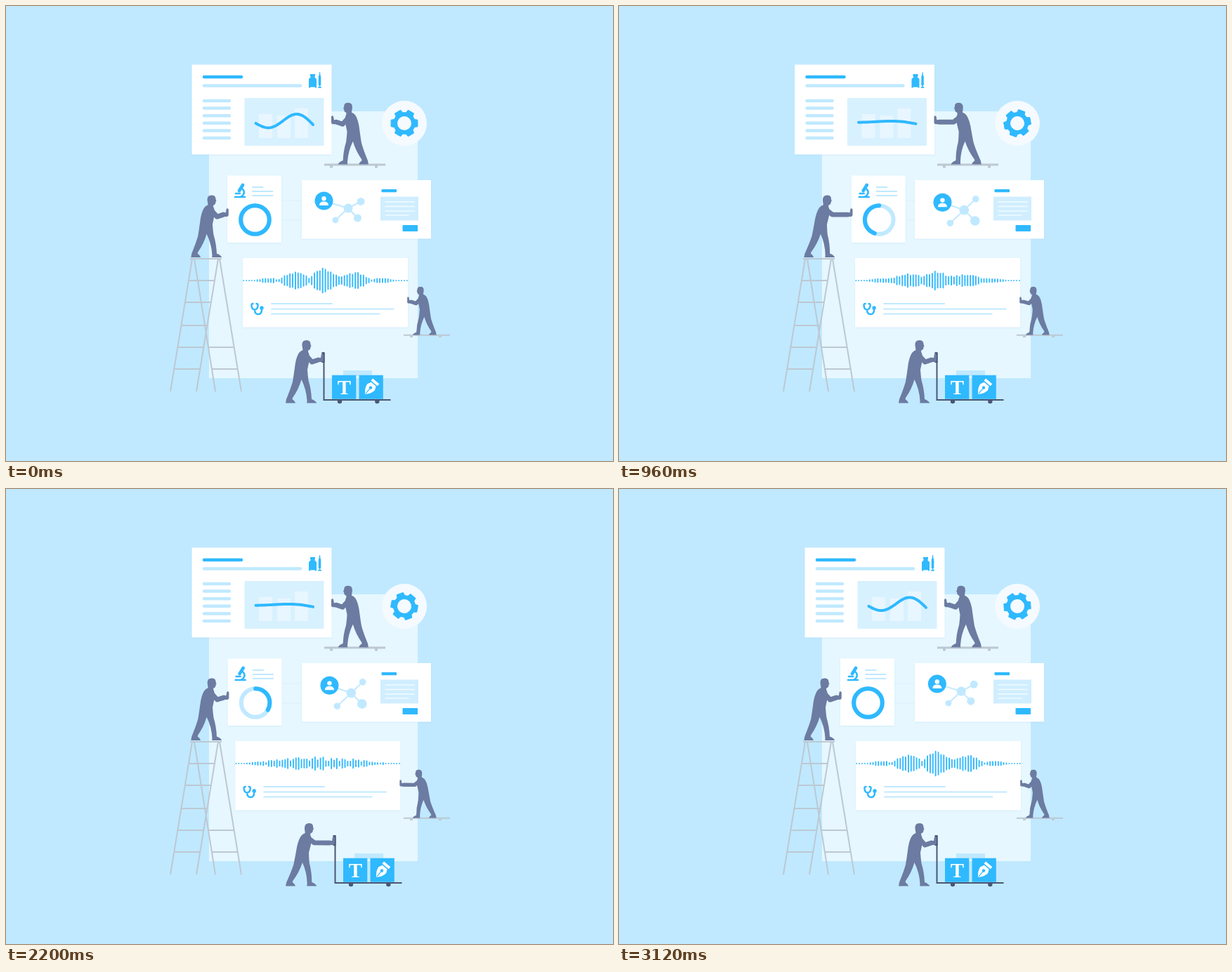
Recreate the animation shown at these times as an HTML page. Size 864 px wide and 648 px high, loop 3160 ms.

```html
<!DOCTYPE html>
<html>
<head>
<meta charset="utf-8">
<style>
html, body { margin: 0; height: 100%; overflow: hidden; background: #c0e9ff; }
svg { display: block; width: 864px; height: 648px; }
.card { fill: #fff; filter: drop-shadow(0 1px 1px rgba(60, 140, 190, .1)); }
.blue { fill: #2fb9ff; }
.pale { fill: #c0e9ff; }
.white { fill: #fff; }
.dark { fill: #4a5677; }
.man { fill: #6c7ba1; }
.line { fill: none; stroke: #c0e9ff; stroke-width: 2; stroke-linecap: round; }
.ink { fill: none; stroke: #2fb9ff; stroke-linecap: round; stroke-linejoin: round; }
.grey { fill: none; stroke: #bdc8d2; stroke-width: 2; }
.thick { stroke-width: 4.5; }
text { font: bold 29px "Liberation Serif", "Times New Roman", serif; }
</style>
</head>
<body>
<svg viewBox="0 0 864 648">
  <rect x="289" y="150" width="297" height="380" fill="#e6f7ff"/>
  <path d="M392 277H421M392 305H421" stroke="#dcf1fc" fill="none"/>

  <g id="report">
    <rect class="card" x="264.5" y="83.5" width="199" height="128"/>
    <path class="ink thick" d="M282 101H335"/>
    <path class="line thick" d="M282 113.5H419"/>
    <path id="list" class="line thick"/>
    <rect x="339.5" y="131" width="113" height="68" fill="#d8f1ff"/>
    <path fill="#e8f6ff" d="M360 154h19v34h-19zM386 156h19v32h-19zM411 146h19v42h-19z"/>
    <path id="trend" class="ink" stroke-width="4"/>
    <path class="blue" d="M433 97h7v3l-1 1 3 3v12.5h-2v-1h-7v1h-2V104l3-3-1-1zM446.200 94h.8l.5 5 .8 1v13h-1v2h1.500v1.800h-4.500V115h1.500v-2h-1V100l.8-1z"/>
  </g>

  <path class="grey" style="stroke-width:3" d="M453 226H540M461 229h4M525 229h4"/>

  <g id="study">
    <rect class="card" x="315" y="241.5" width="77" height="95.5"/>
    <path class="ink" stroke-width="2.600" d="M326 272H340M336 260q5 4 1.500 9q-1 2-4 3M327 267h6"/>
    <path class="ink" stroke-width="4.600" d="M337 255L332 263"/>
    <path class="line" d="M351 258H365.500M351 264H379.500M351 270H379.500"/>
    <circle class="line" cx="354.500" cy="304.500" r="20.300" style="stroke-width:6"/>
    <path id="ring" class="ink" pathLength="1" stroke-width="6" d="M354.500 284.200a20.300 20.300 0 0 1 0 40.600a20.300 20.300 0 0 1 0-40.600"/>
  </g>

  <g>
    <rect class="card" x="421" y="248" width="184" height="83.500"/>
    <path id="links" class="line"/>
    <g id="nodes" class="pale"></g>
    <g id="user">
      <circle class="blue" r="13"/>
      <circle class="white" cy="-3.200" r="3.200"/>
      <path class="white" d="M-6.500 6.500q0-5.500 6.500-5.500t6.500 5.500z"/>
    </g>
    <rect class="blue" x="534.500" y="261" width="21.500" height="4.200" rx=".8"/>
    <rect x="533" y="271.500" width="54" height="34" fill="#d0eeff"/>
    <path class="line" style="stroke:#f2fbff;stroke-width:1.500" d="M540 279H581M540 285.500H581M540 292H581M540 298H573"/>
    <rect class="blue" x="564.500" y="312" width="21.500" height="9" rx=".8"/>
  </g>

  <g id="audio">
    <rect class="card" x="337" y="359" width="235" height="98.500"/>
    <path id="wave" class="ink" stroke-width="1.900"/>
    <path class="ink" stroke-width="2.500" d="M351.500 424q-2.500 0-2 3q.3 5 4.500 5.500q4-.5 4.500-5.500q.5-3-2-3M354 433q0 6 5 6q5 0 5-7"/>
    <circle class="blue" cx="364" cy="430" r="2.700"/>
    <path class="line" d="M378 424H464M378 431.500H551.500M378 438.500H531.500"/>
  </g>

  <path class="grey" d="M566 468.700H632M575 471h4M616 471h4"/>
  <path class="grey" d="M262 360H307M265 360L234 549M302 360L271 549M268 360L298 549M304 360L335 549
    M260 391H297M255 422H292M250 455H286M245 486H281M239 517H276M288 486H325M293 517H330"/>

  <circle cx="567" cy="167" r="32" fill="#f5faff"/>
  <g id="gear">
    <path id="teeth" class="blue" stroke="#2fb9ff" stroke-linejoin="round"/>
    <circle r="10" fill="#f5faff"/>
  </g>

  <g id="cart">
    <rect class="pale" x="480" y="519" width="41" height="8"/>
    <path class="blue" d="M464 525.700h34.300v34h-34.300zM502.500 525.700h34.300v34h-34.300z"/>
    <text class="white" x="481.300" y="553" text-anchor="middle">T</text>
    <g transform="translate(519 543.500) rotate(40)">
      <path class="white" d="M0 12Q-6.500 6-7-1L-4.500-6.500H4.500L7-1Q6.500 6 0 12zM-6-12h12v4h-12z"/>
      <path class="ink" d="M0 1V10" stroke-width="1.200"/>
      <circle class="blue" r="2.200"/>
    </g>
    <path d="M452.500 494V561H547.500" fill="none" stroke="#4a5677" stroke-width="2"/>
    <rect class="dark" x="449.500" y="493" width="4" height="15"/>
    <circle class="dark" cx="475" cy="563" r="3.200"/>
    <circle class="dark" cx="528.300" cy="563" r="3.200"/>
  </g>

  <g id="men" class="man"></g>
</svg>
<script>
const LOOP = 3160, MOVE = 640, STEP = 427, BACK = 1206, TURN = 1740, FILL = 1380;
const { sin, cos, abs, min, max, PI } = Math;
const $ = id => document.getElementById(id);
const set = (el, attrs) => Object.entries(attrs).forEach(([k, v]) => el.setAttribute(k, v));
const range = n => [...Array(n).keys()];
const mix = (a, b, m) => a + (b - a) * m;
const clamp = v => min(1, max(0, v));
const ease = v => (v = clamp(v), v * v * (3 - 2 * v));
const polar = (r, deg) => [r * cos(deg * PI / 180), r * sin(deg * PI / 180)];
const noise = n => abs(sin(n * 12.9898) * 43758.5453) % 1;

// Pushing figure facing right; origin on the ground below the head
const BODY = `M-6-82.500Q-6.500-90 0-90Q6-90 6-84.500L7-81.300L6-80.500Q6-76 3-76L2.500-73.500Q5-70 4-60L1.500-48
  Q2-40 3-33Q7-20 7.500-6Q13-4 14.800-.5H.8L1-4Q0-20-7-34Q-11-20-19.500-8L-20-6Q-16-3-15.500-.5H-29.500
  L-28.500-6Q-22-22-19.500-31Q-18-40-17.500-44L-16.500-51Q-15-65-10.500-72Q-8-75-5-76z`;

function man(x, y, size, dir) {
  const g = document.createElementNS("http://www.w3.org/2000/svg", "g");
  set(g, { transform: `translate(${x} ${y}) scale(${size * dir} ${size})` });
  g.innerHTML = `<path d="${BODY}"/>
    <path fill="none" stroke="#6c7ba1" stroke-width="7" stroke-linejoin="round" stroke-linecap="round"/>
    <path d="M17-65L20.500-65L21.500-70.500Q24-72 24.500-69.500V-61Q24-59 22-59H18z"/>`;
  $("men").append(g);
  const [body, arm, hand] = g.children;
  return shift => {
    const d = abs(shift) / size, lean = d * .22;
    set(body, { transform: `matrix(1 0 ${-lean / 83} 1 0 0)` });
    set(arm, { d: `M${-1 + lean}-69L${8 + d * .2} ${-59 - d * .2}L${17 + d}-62` });
    set(hand, { transform: `translate(${d})` });
  };
}

// Each group is pushed by its own figure, one after another
const pushes = [
  ["report", -14.5, man(487, 226, .98, -1)],
  ["study", 17, man(292.5, 358.5, .99, 1)],
  ["audio", -12.3, man(590, 469, .77, -1)],
  ["cart", 16, man(427.5, 566, 1, 1)]
];

// Spokes of the network: angle, turn, length, radius, growth
const spokes = [[-28, -26, 20.4, 5.5, -1.1], [46, -2, 19.4, 5.5, 2.2], [137, 0, 24.8, 4.4, .6]];
$("nodes").innerHTML = "<circle/>".repeat(spokes.length + 1);

$("list").setAttribute("d", range(6).map(i => `M282 ${135 + i * 10.6}H318`).join(""));

const teeth = range(6).flatMap(k => [[15.5, -21], [19.5, -14], [19.5, 14], [15.5, 21]].map(([r, a]) => polar(r, k * 60 + a)));
set($("teeth"), { d: `M${teeth.join("L")}z` });

function drawTrend(m) {
  const points = range(41).map(i => {
    const u = i / 40;
    const y = mix(167, 165, m) + 2 * u + mix(10, -5.3, m) * sin(2 * PI * u) - mix(6, .7, m) * sin(PI * u);
    return [355.5 + 81.5 * u, y];
  });
  set($("trend"), { d: `M${points.join("L")}` });
}

function drawRing(t) {
  const cut = t < TURN ? t / TURN : 0;
  const shown = t < TURN ? 1 - cut : clamp((t - TURN) / FILL);
  $("ring").style.strokeDasharray = `${shown} 1`;
  $("ring").style.strokeDashoffset = -cut;
}

function drawNetwork(m) {
  const hub = [487 + 7 * m, 288 + 4.3 * m, 6.5 + .6 * m];
  const user = [452.5 + 13.1 * m, 277.5 + 3.8 * m];
  const ends = spokes.map(([angle, turn, length, r, grow]) => {
    const [dx, dy] = polar(length + 4 * m, angle + turn * m);
    return [hub[0] + dx, hub[1] + dy, r + grow * m];
  });
  [hub, ...ends].forEach(([cx, cy, r], i) => set($("nodes").children[i], { cx, cy, r }));
  set($("links"), { d: [user, ...ends].map(([x, y]) => `M${hub[0]} ${hub[1]}L${x} ${y}`).join("") });
  set($("user"), { transform: `translate(${user})` });
}

// Swells twice per loop with a calm stretch before the second swell
function volume(t) {
  if (t < 1280) return ease(abs(t - 640) / 640);
  return max(1 - ease((t - 1280) / 400), ease((t - 2460) / 660));
}

function drawWave(t) {
  const v = volume(t);
  const bars = range(61).map(i => {
    const swell = sin(PI * i / 60);
    const loud = 37 * swell ** 1.6 * (.25 + .75 * abs(sin(PI * (i - 1) / 11.5))) * (.65 + .35 * noise(i + 1));
    const quiet = 20 * swell ** 1.3 * (.4 + .6 * noise(i + 90));
    const half = max(.05, mix(quiet, loud, v) / 2 - .9);
    return `M${338.3 + i * 3.875} ${391 - half}v${half * 2}`;
  });
  set($("wave"), { d: bars.join("") });
}

function draw(t) {
  const m = 1 - abs(1 - t / (LOOP / 2));
  pushes.forEach(([id, dist, pose], i) => {
    const start = t - i * STEP;
    const x = dist * (ease(start / MOVE) - ease((start - BACK) / MOVE));
    set($(id), { transform: `translate(${x})` });
    pose(x);
  });
  drawTrend(m);
  drawRing(t);
  drawNetwork(m);
  drawWave(t);
  set($("gear"), { transform: `translate(567 167) rotate(${t / LOOP * 360})` });
}

function tick() {
  draw(Math.floor(performance.now() / 40) * 40 % LOOP);
  requestAnimationFrame(tick);
}
tick();
</script>
</body>
</html>
```
